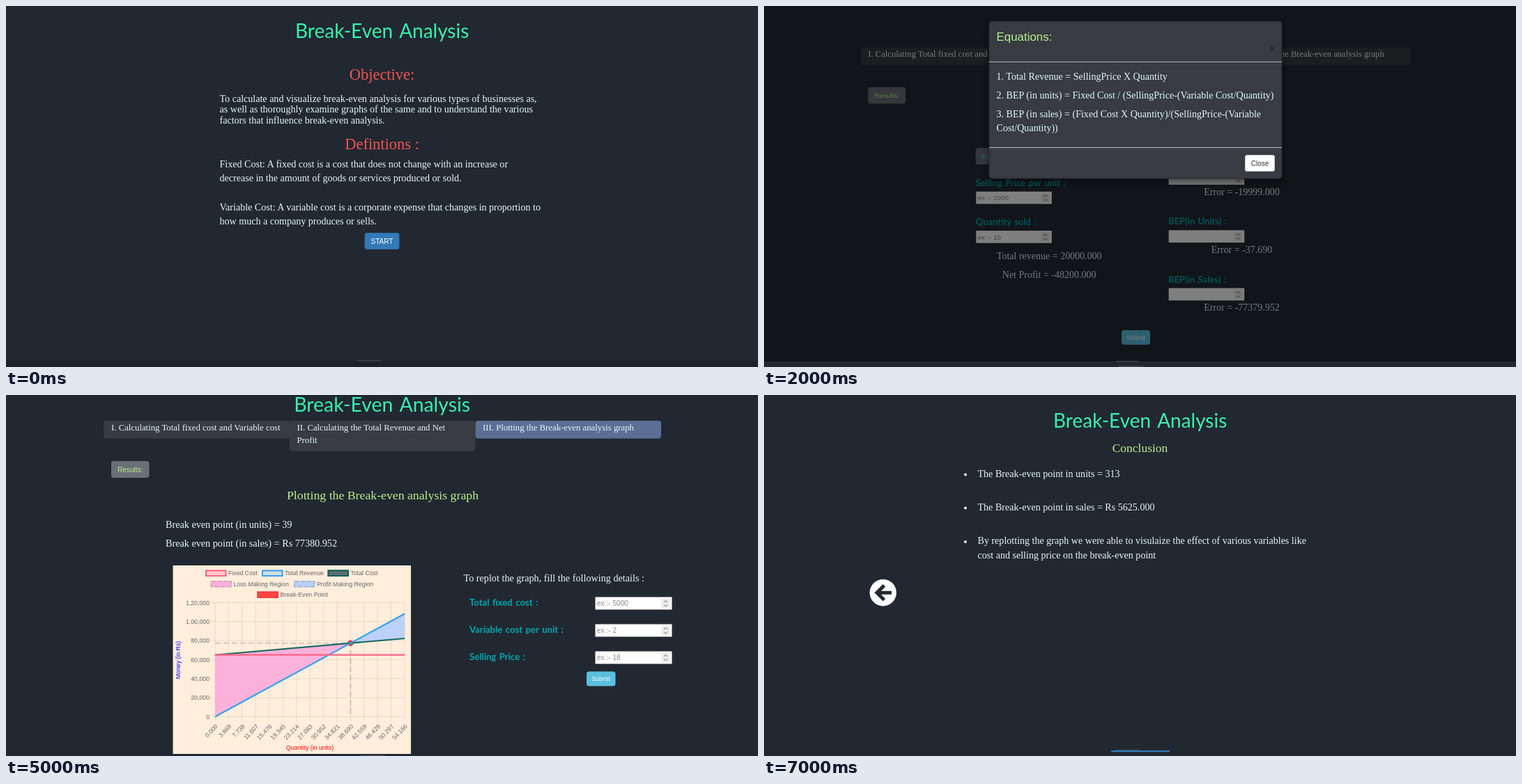
An HTML page for the animation above (8000 ms loop, 1079x519 px).

```html
<!DOCTYPE html>
<html lang="en">
<head>
<meta charset="utf-8">
<title>Break-Even Analysis</title>
<style>
html, body { margin: 0; width: 100%; height: 100%; overflow: hidden; background: #222831; }
svg { display: block; width: 100%; height: 100%; }
text { white-space: pre; }
.serif { font-family: "Liberation Serif", Times, serif; }
.sans { font-family: "Liberation Sans", Arial, sans-serif; }
.hum { font-family: Lato, sans-serif; word-spacing: .1em; }
.screen { visibility: hidden; animation: show 8s step-end infinite; animation-delay: calc(var(--i) * 1s); }
@keyframes show {
  0% { visibility: visible; }
  12.5%, 100% { visibility: hidden; }
}
</style>
</head>
<body>
<svg id="stage" viewBox="0 0 1079 519"></svg>
<script>
const C = {
  page: '#222831', panel: '#383b42', ink: '#e0f7fa', mint: '#3af0ae', lime: '#b7f08d',
  red: '#f05454', teal: '#00a9b1', active: '#5c6e94', grey: '#6a6f78'
};
const PAGE_SCALE = 0.987;
const BODY = 14.07;

const rect = (x, y, w, h, fill, extra = '') =>
  `<rect x="${x}" y="${y}" width="${w}" height="${h}" fill="${fill}" ${extra}/>`;
const path = (d, stroke, width = 1, extra = '') =>
  `<path d="${d}" fill="none" stroke="${stroke}" stroke-width="${width}" ${extra}/>`;
const text = (font, s, x, y, size, fill, anchor = 'start', extra = '') =>
  `<text class="${font}" x="${x}" y="${y}" font-size="${size}" fill="${fill}" text-anchor="${anchor}" ${extra}>${s}</text>`;
const serif = (s, x, y, size = 14.2, fill = C.ink, anchor) => text('serif', s, x, y, size, fill, anchor);
const sans = (s, x, y, size, fill, anchor) => text('sans', s, x, y, size, fill, anchor);
const label = (s, x, y) => text('hum', s, x, y, 13.1, C.teal, 'start', 'font-weight="700"');
const title = (y, size) => text('hum', 'Break-Even Analysis', 539.7, y, size, C.mint, 'middle');
const group = (transform, body) => `<g transform="${transform}">${body}</g>`;

function button(s, x, y, w, h, fill, ink, size = 10.1, border = fill) {
  return rect(x + .5, y + .5, w - 1, h - 1, fill, `rx="2.5" stroke="${border}"`) +
    sans(s, x + w / 2, y + h / 2 + size * .36, size, ink, 'middle');
}

function input(x, y, hint = '') {
  return rect(x, y, 110, 18, '#fff') +
    rect(x + 95, y + 2.5, 12, 13, '#ebebeb') +
    path(`M${x + 98.5} ${y + 7.5}l2.5 -2.5l2.5 2.5M${x + 98.5} ${y + 11}l2.5 2.5l2.5 -2.5`, '#666') +
    sans(hint, x + 2.5, y + 12.8, 10.1, '#8a8a8a');
}

const submit = (x, y, fill = '#5bc0de') => button('Submit', x, y, 41.5, 21, fill, '#fff', 8.6);
const dash = (x, y, w = 35) => rect(x, y, w, 1, '#50565e');

function header(active, dy = 0) {
  const tabs = [
    ['I. Calculating Total fixed cost and Variable cost'],
    ['II. Calculating the Total Revenue and Net', 'Profit'],
    ['III. Plotting the Break-even analysis graph']
  ];
  const tab = (lines, i) => {
    const x = 140.5 + i * 266.5;
    return rect(x, 61, 266.5, lines.length > 1 ? 43.5 : 25.5, i === active ? C.active : C.panel, 'rx="4"') +
      lines.map((s, n) => serif(s, x + 10.5, 74.8 + n * 18, 12.78)).join('');
  };
  return group(`translate(0 ${dy})`, title(48, 28.4) + tabs.map(tab).join('') +
    button('Results:', 151, 119, 54.5, 24, C.grey, C.lime));
}

const intro = () => title(46, 28) +
  serif('Objective:', 539.5, 106, 22.4, C.red, 'middle') +
  ['To calculate and visualize break-even analysis for various types of businesses as,',
    'as well as thoroughly examine graphs of the same and to understand the various',
    'factors that influence break-even analysis.'].map((s, i) => serif(s, 306.5, 137.5 + i * 15.6, BODY)).join('') +
  serif('Defintions :', 539.5, 206, 22.4, C.red, 'middle') +
  [['Fixed Cost: A fixed cost is a cost that does not change with an increase or', 232],
    ['decrease in the amount of goods or services produced or sold.', 252.3],
    ['Variable Cost: A variable cost is a corporate expense that changes in proportion to', 293.5],
    ['how much a company produces or sells.', 313.8]].map(([s, y]) => serif(s, 306.5, y, BODY)).join('') +
  button('START', 514.5, 326, 50, 24, '#337ab7', '#fff', 10, '#2e6da4') +
  rect(0, 511, 1079, 8, '#1d232b') + dash(504, 509.5, 34);

const costs = () => header(0) +
  serif('Calculating Total fixed cost and Variable cost', 540, 174, 17.75, C.lime, 'middle') +
  button('Formulae:', 307.5, 207.5, 63.5, 24, C.grey, C.mint) +
  label('Total fixed cost :', 307.5, 263) + input(308, 271, 'ex :- 5000') +
  label('Variable cost per unit :', 307.5, 319.5) + input(308, 328, 'ex :- 2') +
  serif('Total Fixed Cost: 65000', 338, 369.5) +
  serif('Total Variable Cost: 3200', 338, 396.5) +
  submit(519.5, 473) + dash(509, 517.5);

function revenue(submitFill) {
  const checks = [['Total revenue :', '-19999.000'], ['BEP(in Units) :', '-37.690'], ['BEP(in Sales) :', '-77379.952']];
  return header(1) +
    serif('Calculating the Total Revenue and Net Profit', 540, 174, 17.75, C.lime, 'middle') +
    serif('Calculate the following:', 550.5, 200) +
    button('Formulae:', 307.5, 207.5, 63.5, 24, C.grey, C.mint) +
    label('Selling Price per unit :', 307.5, 263) + input(308, 271, 'ex :- 2000') +
    label('Quantity sold :', 307.5, 319.5) + input(308, 328, 'ex :- 10') +
    serif('Total revenue = 20000.000', 338, 369.5) +
    serif('Net Profit = -48200.000', 346, 396.5) +
    checks.map(([s, err], i) => {
      const y = i * 84.3;
      return label(s, 587.5, 235 + y) + input(588, 243 + y) +
        serif('Error = ' + err, 694.3, 276 + y, 14.2, C.ink, 'middle');
    }).join('') +
    submit(519.5, 473, submitFill);
}

function modal(name, top, bottom, lines, closeFill) {
  const pageTop = top - 22, shadeEnd = top + 489;
  const rule = y => path(`M323 ${y}H743`, '#b9bbbc');
  return group(`translate(.3 ${pageTop - .7}) scale(${PAGE_SCALE})`, revenue()) +
    rect(0, pageTop / 2, 1079, shadeEnd - pageTop / 2, '#000', 'opacity=".5"') +
    rect(0, shadeEnd, 1079, 519 - shadeEnd, C.page) +
    rect(323, top, 420, bottom - top, C.panel, 'rx="4" stroke="#24272c" filter="url(#shadow)"') +
    sans(name, 333.5, top + 28, 16.9, C.lime) +
    sans('×', 729, top + 44, 14, '#17191c', 'middle') +
    rule(top + 58.3) + rule(bottom - 44.5) +
    lines.map(([s, y]) => serif(s, 333.5, top + y, BODY)).join('') +
    button('Close', 690, bottom - 34, 43, 24, closeFill, '#333', 10, '#ccc') +
    dash(504, shadeEnd - .5, 34) + dash(509, 517.5);
}

const equations = () => modal('Equations:', 22, 248, [
  ['1. Total Revenue = SellingPrice X Quantity', 83.7],
  ['2. BEP (in units) = Fixed Cost / (SellingPrice-(Variable Cost/Quantity)', 110.8],
  ['3. BEP (in sales) = (Fixed Cost X Quantity)/(SellingPrice-(Variable', 138],
  ['Cost/Quantity))', 158]
], '#fff');

const results = () => modal('Results', 24, 311, [
  'Total Fixed Cost: 65000', 'Total Variable Cost: 3200', 'Total Revenue: 20000.000',
  'Net Profit: Rs -48200.000', 'BEP (in units): 38.690', 'BEP (in sales): Rs 77380.952'
].map((s, i) => [s, 83.7 + i * 27.1]), '#ebebeb');

function legend() {
  const items = [
    ['Fixed Cost', 286, 251.5, '#ffc9cc', '#ff6384'], ['Total Revenue', 367, 251.5, '#cfdfe2', '#36a2eb'],
    ['Total Cost', 461.5, 251.5, '#5b6f70', '#0f6157'], ['Loss Making Region', 293.5, 267, '#fdb0db', '#d3a8bd', 1],
    ['Profit Making Region', 413, 267, '#bad0f9', '#a9b5cb', 1], ['Break-Even Point', 360.5, 282.5, '#ff4545', '#f33a3a']
  ];
  return items.map(([s, x, y, fill, stroke, dashed]) =>
    rect(x, y, 30.5, 9.5, fill) +
    rect(x + 1, y + 1, 28.5, 7.5, 'none', `stroke="${stroke}" stroke-width="2" ${dashed ? 'stroke-dasharray="6 3"' : ''}`) +
    sans(s, x + 33, y + 7.5, 8.75, '#666')).join('');
}

function chart({ fixed, unit, price, step, max, left, base }) {
  const bep = fixed / (price - unit), end = bep * 1.4, right = 572, top = 298.5;
  const X = q => left + (right - left) * q / end;
  const Y = v => base - (base - top) * v / max;
  const at = (q, v) => `${X(q)} ${Y(v)}`;
  const peak = price * bep;
  let grid = '', ticks = '';
  for (let v = 0; v <= max; v += step) {
    grid += `M${left - 6} ${Y(v)}H${right}`;
    ticks += sans(v.toLocaleString('en-IN'), left - 8, Y(v) + 3, 8.75, '#666', 'end');
  }
  for (let i = 0; i <= 14; i++) {
    const q = bep * i / 10, x = X(q);
    grid += `M${x} ${top}V${base + 6}`;
    ticks += text('sans', (Math.floor(q * 1000) / 1000).toFixed(3), 0, 0, 8.75, '#666', 'end',
      `transform="translate(${x + 4.5} ${base + 14.5}) rotate(-46)"`);
  }
  const lossArea = `M${at(0, fixed)}L${at(bep, peak)}L${at(0, 0)}Z`;
  const profitArea = `M${at(bep, peak)}L${at(end, price * end)}L${at(end, fixed + unit * end)}Z`;
  return rect(239.5, 245, 341.5, 271, '#ffeedc') + legend() + path(grid, '#000', .9, 'opacity=".1"') + ticks +
    `<path d="${lossArea}" fill="#fcaedb" opacity=".93"/><path d="${profitArea}" fill="#b7cffb" opacity=".93"/>` +
    path(`M${at(0, peak)}L${at(bep, peak)}L${at(bep, 0)}`, '#000', 2, 'opacity=".16" stroke-dasharray="8 4"') +
    `<circle cx="${X(bep)}" cy="${Y(peak)}" r="4" fill="#e33b3b" stroke="#c96a6a" stroke-width=".8"/>` +
    path(`M${at(0, fixed)}L${at(end, fixed + unit * end)}`, '#17695f', 2) +
    path(`M${at(0, 0)}L${at(end, price * end)}`, '#36a2eb', 2.2) +
    path(`M${at(0, fixed)}L${at(end, fixed)}`, '#ff6384', 2.2) +
    text('sans', 'Money (in Rs)', 0, 0, 8.75, '#00f', 'middle', 'transform="translate(250 381) rotate(-90)"') +
    sans('Quantity (in units)', 436, 509.5, 8.75, '#f00', 'middle');
}

function plot(units, sales, data) {
  const fields = [['Total fixed cost :', 5000], ['Variable cost per unit :', 2], ['Selling Price :', 18]];
  return header(2, -24) +
    serif('Plotting the Break-even analysis graph', 540.5, 150, 17.75, C.lime, 'middle') +
    serif(`Break even point (in units) = ${units}`, 229, 190.5) +
    serif(`Break even point (in sales) = Rs ${sales}`, 229, 218) +
    chart(data) +
    serif('To replot the graph, fill the following details :', 656.5, 268) +
    fields.map(([s, hint], i) => label(s, 665, 303 + i * 39) + input(845.5, 290.5 + i * 39, 'ex :- ' + hint)).join('') +
    submit(833, 397.5) + dash(509, 517.5);
}

const conclusion = () => title(46.5, 28) +
  serif('Conclusion', 539.5, 82, 17.5, C.lime, 'middle') +
  [114.5, 162.5, 211].map(y => `<circle cx="289" cy="${y}" r="2" fill="${C.ink}"/>`).join('') +
  [['The Break-even point in units = 313', 117.7], ['The Break-even point in sales = Rs 5625.000', 166],
    ['By replotting the graph we were able to visulaize the effect of various variables like', 214.3],
    ['cost and selling price on the break-even point', 234.5]].map(([s, y]) => serif(s, 306.5, y, BODY)).join('') +
  '<circle cx="170.8" cy="284.2" r="19.2" fill="#fff"/>' +
  path('M183 284.2H163M172.5 273.7L162 284.2L172.5 294.7', C.page, 5) +
  rect(498, 511, 84, 2.2, '#337ab7', 'rx="1"') + rect(503, 510.3, 35, 1, '#3d5f80');

const screens = [
  intro(),
  costs(),
  equations(),
  revenue('#31b0d5') + dash(509, 517.5),
  results(),
  plot(39, '77380.952', { fixed: 65000, unit: 320, price: 2000, step: 20000, max: 120000, left: 300, base: 462.5 }),
  plot(313, '5625.000', { fixed: 5000, unit: 2, price: 18, step: 1000, max: 8000, left: 289, base: 459 }),
  conclusion()
];

document.getElementById('stage').innerHTML =
  '<defs><filter id="shadow"><feDropShadow dx="0" dy="4" stdDeviation="6" flood-opacity=".5"/></filter></defs>' +
  rect(0, 0, 1079, 519, C.page) +
  screens.map((body, i) => `<g class="screen" style="--i:${i}">${body}</g>`).join('');
</script>
</body>
</html>
```
